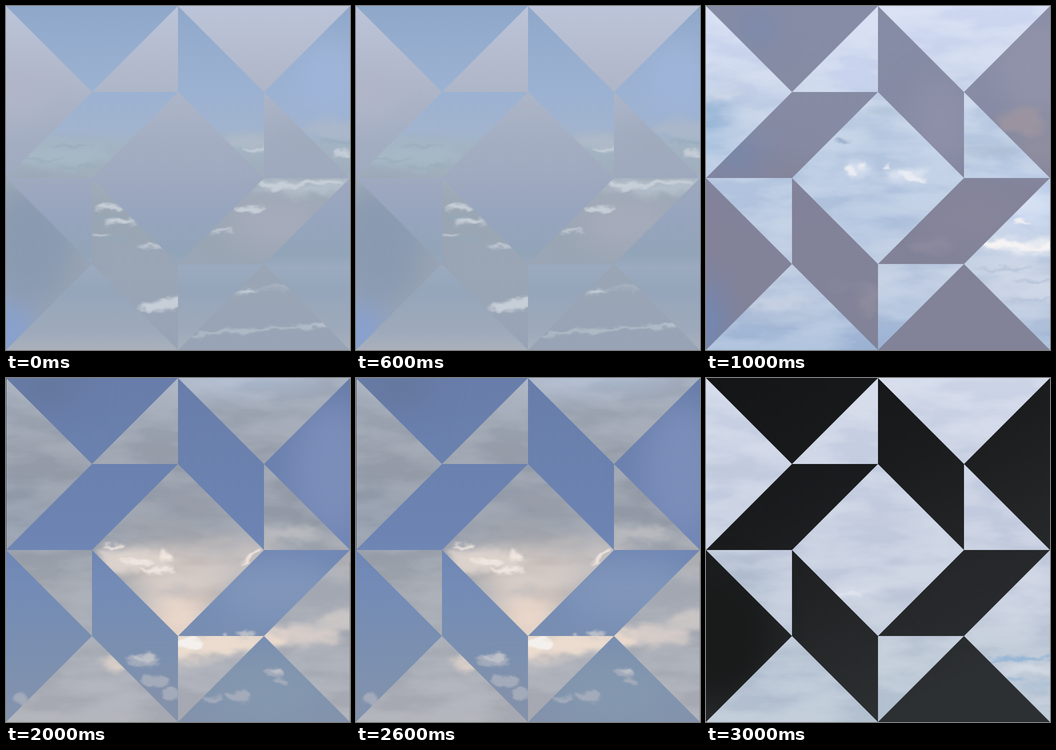
An HTML page for the animation above (4 s loop, 748 px wide and 748 px high).

```html
<!DOCTYPE html>
<html lang="en">
<head>
<meta charset="utf-8">
<title>Sky quilt</title>
<style>
html, body { margin: 0; width: 100%; height: 100%; overflow: hidden; background: #9ba9c0; }
svg { position: absolute; left: 0; top: 0; width: 100%; height: 100%; }
.sky { opacity: 0; will-change: opacity; animation: show 4s step-end calc(var(--i) * 1s - 4s) infinite; }
@keyframes show { 0% { opacity: 1; } 25%, 100% { opacity: 0; } }
.patches { clip-path: url(#patches); }
.haze { filter: url(#haze); }
.soft { filter: url(#soft); }
.wisp { filter: url(#wisp); }
.clouds { filter: url(#clouds); mix-blend-mode: soft-light; }
</style>
</head>
<body>
<svg viewBox="0 0 748 748" aria-hidden="true">
<defs>
  <clipPath id="patches">
    <path d="M0 0L187 187 0 374zM374 0V187H187zM374 0H748L561 187zM561 187L748 374H561zM374 187L561 374 374 561 187 374zM0 374H187V561zM0 748L187 561 374 748zM374 561H561L374 748zM748 374V748L561 561z"/>
  </clipPath>
  <filter id="haze" filterUnits="userSpaceOnUse" x="-150" y="-150" width="1048" height="1048" color-interpolation-filters="sRGB">
    <feGaussianBlur stdDeviation="32"/>
  </filter>
  <filter id="soft" filterUnits="userSpaceOnUse" x="-80" y="-80" width="908" height="908" color-interpolation-filters="sRGB">
    <feTurbulence type="fractalNoise" baseFrequency=".018 .03" numOctaves="3" seed="4" result="n"/>
    <feGaussianBlur in="SourceGraphic" stdDeviation="9"/>
    <feDisplacementMap in2="n" scale="38" xChannelSelector="R" yChannelSelector="G"/>
  </filter>
  <filter id="wisp" filterUnits="userSpaceOnUse" x="-40" y="-40" width="828" height="828" color-interpolation-filters="sRGB">
    <feTurbulence type="fractalNoise" baseFrequency=".03 .05" numOctaves="3" seed="9" result="n"/>
    <feGaussianBlur in="SourceGraphic" stdDeviation="2.5"/>
    <feDisplacementMap in2="n" scale="24" xChannelSelector="R" yChannelSelector="G"/>
  </filter>
  <filter id="clouds" filterUnits="userSpaceOnUse" x="0" y="0" width="748" height="748" color-interpolation-filters="sRGB">
    <feTurbulence type="fractalNoise" baseFrequency=".007 .022" numOctaves="4" seed="12"/>
    <feColorMatrix values="2.6 0 0 0 -.8  2.6 0 0 0 -.8  2.6 0 0 0 -.8  0 0 0 0 1"/>
  </filter>

  <linearGradient id="sea" x2="0" y2="1">
    <stop stop-color="#8fa8ca"/><stop offset=".25" stop-color="#9cb2d2"/>
    <stop offset=".36" stop-color="#a1b3ce"/><stop offset=".4" stop-color="#a3b4c4"/>
    <stop offset=".5" stop-color="#a0adba"/><stop offset=".6" stop-color="#9ba6b4"/>
    <stop offset="1" stop-color="#98a4b6"/>
  </linearGradient>
  <linearGradient id="mist" x2="0" y2="1">
    <stop stop-color="#bcc4d9"/><stop offset=".2" stop-color="#b1b8ca"/>
    <stop offset=".35" stop-color="#a6b0c4"/><stop offset=".5" stop-color="#9fa9bf"/>
    <stop offset=".6" stop-color="#97a5be"/><stop offset=".72" stop-color="#92a4b8"/>
    <stop offset=".76" stop-color="#9baabf"/><stop offset=".82" stop-color="#95a5ba"/>
    <stop offset=".95" stop-color="#9eaabb"/><stop offset="1" stop-color="#aab0bb"/>
  </linearGradient>
  <linearGradient id="dusk" x2="0" y2="1">
    <stop stop-color="#868ca5"/><stop offset=".4" stop-color="#868ba3"/>
    <stop offset=".55" stop-color="#82839a"/><stop offset="1" stop-color="#828398"/>
  </linearGradient>
  <linearGradient id="pale" x2="0" y2="1">
    <stop stop-color="#d6def3"/><stop offset=".2" stop-color="#cfd9ed"/>
    <stop offset=".36" stop-color="#c1d0e5"/><stop offset=".55" stop-color="#bccce3"/>
    <stop offset=".8" stop-color="#c0cde2"/><stop offset="1" stop-color="#a8bdda"/>
  </linearGradient>
  <linearGradient id="blue" x2="0" y2="1">
    <stop stop-color="#687da9"/><stop offset=".45" stop-color="#6d84b3"/>
    <stop offset=".6" stop-color="#738bb6"/><stop offset=".8" stop-color="#7b90b0"/>
    <stop offset="1" stop-color="#8493ac"/>
  </linearGradient>
  <linearGradient id="eve" x2="0" y2="1">
    <stop stop-color="#a6afbd"/><stop offset=".2" stop-color="#9ea5b1"/>
    <stop offset=".4" stop-color="#9aa1ad"/><stop offset=".6" stop-color="#a5aab3"/>
    <stop offset=".85" stop-color="#adb1ba"/><stop offset="1" stop-color="#afb1b8"/>
  </linearGradient>
  <linearGradient id="night" x2=".5" y2="1">
    <stop stop-color="#141516"/><stop offset=".4" stop-color="#191b1d"/>
    <stop offset=".7" stop-color="#232527"/><stop offset="1" stop-color="#2d3032"/>
  </linearGradient>
  <linearGradient id="veil" x2="0" y2="1">
    <stop stop-color="#d3daea"/><stop offset=".3" stop-color="#cbd3e4"/>
    <stop offset=".6" stop-color="#c9d1e1"/><stop offset=".8" stop-color="#c0cad8"/>
    <stop offset="1" stop-color="#bdc9d7"/>
  </linearGradient>
</defs>
</svg>

<svg class="sky" style="--i:0" viewBox="0 0 748 748">
  <rect width="748" height="748" fill="url(#sea)"/>
  <g class="haze">
    <ellipse cx="50" cy="520" rx="100" ry="130" fill="#8a9ab0"/>
    <ellipse cx="0" cy="715" rx="60" ry="70" fill="#86a0d0"/>
    <ellipse cx="590" cy="470" rx="110" ry="60" fill="#a5abba"/>
    <ellipse cx="700" cy="160" rx="80" ry="90" fill="#9eb4d8"/>
  </g>
  <g class="soft">
    <ellipse cx="720" cy="270" rx="75" ry="22" fill="#aab7ca"/>
    <ellipse cx="530" cy="297" rx="50" ry="18" fill="#afbac8"/>
    <ellipse cx="110" cy="325" rx="120" ry="26" fill="#a6b7c5"/>
    <ellipse cx="660" cy="392" rx="120" ry="14" fill="#b6c1cd"/>
  </g>
  <g class="wisp">
    <g fill="#93a8b8" opacity=".6">
      <ellipse cx="80" cy="335" rx="50" ry="3"/><ellipse cx="150" cy="350" rx="45" ry="3"/>
      <ellipse cx="140" cy="305" rx="45" ry="3"/><ellipse cx="225" cy="460" rx="35" ry="6"/>
      <ellipse cx="240" cy="505" rx="40" ry="4"/><ellipse cx="720" cy="295" rx="35" ry="4"/>
    </g>
    <g fill="#c6ced7">
      <ellipse cx="225" cy="437" rx="30" ry="6"/><ellipse cx="250" cy="468" rx="38" ry="6"/>
      <ellipse cx="205" cy="497" rx="24" ry="3"/><ellipse cx="315" cy="522" rx="28" ry="3"/>
      <ellipse cx="600" cy="390" rx="55" ry="8"/><ellipse cx="685" cy="384" rx="48" ry="6"/>
      <ellipse cx="530" cy="442" rx="36" ry="6"/><ellipse cx="470" cy="490" rx="28" ry="3"/>
      <ellipse cx="545" cy="312" rx="30" ry="4"/><ellipse cx="735" cy="320" rx="22" ry="5"/>
      <path d="M282 657L345 636 380 630V656L320 662z"/>
      <path d="M492 627L520 616 552 619 525 627z"/>
    </g>
    <path d="M400 716Q480 703 560 701T692 686L700 696Q620 703 550 707T400 720z" fill="#b7c0cb"/>
    <path d="M540 618Q600 605 640 610L600 618z" fill="#a7b1c0"/>
  </g>
  <g class="patches">
    <rect width="748" height="748" fill="url(#mist)"/>
    <g class="haze">
      <ellipse cx="10" cy="200" rx="70" ry="40" fill="#b1b6c8"/>
      <ellipse cx="650" cy="310" rx="80" ry="60" fill="#9faabd"/>
    </g>
  </g>
</svg>

<svg class="sky" style="--i:1" viewBox="0 0 748 748">
  <rect width="748" height="748" fill="url(#dusk)"/>
  <g class="haze">
    <ellipse cx="110" cy="45" rx="40" ry="25" fill="#7389b3"/>
    <ellipse cx="70" cy="325" rx="60" ry="35" fill="#7586ac"/>
    <ellipse cx="0" cy="690" rx="35" ry="90" fill="#7088b8"/>
    <ellipse cx="720" cy="130" rx="100" ry="110" fill="#9092a9"/>
    <ellipse cx="510" cy="250" rx="60" ry="90" fill="#8e90a8"/>
    <ellipse cx="150" cy="360" rx="70" ry="25" fill="#84859a"/>
    <ellipse cx="580" cy="460" rx="120" ry="60" fill="#86859a"/>
    <ellipse cx="725" cy="310" rx="45" ry="40" fill="#958f9e"/>
  </g>
  <g class="soft">
    <ellipse cx="690" cy="252" rx="48" ry="28" fill="#9b94a0"/>
    <ellipse cx="490" cy="520" rx="45" ry="14" fill="#8d8a9e"/>
    <ellipse cx="355" cy="640" rx="18" ry="35" fill="#8d8b9d"/>
    <ellipse cx="300" cy="607" rx="50" ry="6" fill="#89889b"/>
  </g>
  <g class="patches">
    <rect width="748" height="748" fill="url(#pale)"/>
    <g class="haze">
      <ellipse cx="0" cy="260" rx="45" ry="70" fill="#a3bfdd"/>
      <ellipse cx="680" cy="430" rx="110" ry="55" fill="#d3def3"/>
      <ellipse cx="345" cy="478" rx="70" ry="16" fill="#9db7d9"/>
      <ellipse cx="700" cy="610" rx="100" ry="60" fill="#cdd6e6"/>
      <ellipse cx="320" cy="150" rx="60" ry="40" fill="#d2dbf2"/>
    </g>
    <rect class="clouds" width="748" height="748" opacity=".24"/>
    <g class="soft">
      <ellipse cx="15" cy="228" rx="22" ry="9" fill="#96b4d3"/>
      <ellipse cx="30" cy="190" rx="50" ry="14" fill="#ced8e8"/>
      <ellipse cx="390" cy="225" rx="35" ry="14" fill="#b3c5da"/>
      <ellipse cx="620" cy="318" rx="65" ry="7" fill="#aabbd0"/>
      <ellipse cx="330" cy="355" rx="32" ry="14" fill="#d9e2f1"/>
      <ellipse cx="440" cy="365" rx="48" ry="16" fill="#dae2f0"/>
      <ellipse cx="150" cy="648" rx="90" ry="9" fill="#ccd4e3"/>
      <ellipse cx="170" cy="676" rx="110" ry="6" fill="#a9bad2"/>
      <ellipse cx="690" cy="520" rx="85" ry="16" fill="#e9ecf3"/>
      <ellipse cx="725" cy="700" rx="45" ry="8" fill="#b4c3da"/>
    </g>
    <g class="wisp">
      <ellipse cx="294" cy="294" rx="20" ry="3" transform="rotate(18 294 294)" fill="#91a7c3"/>
      <g fill="#e9ecf3">
        <ellipse cx="316" cy="360" rx="10" ry="12"/><ellipse cx="342" cy="350" rx="10" ry="6"/>
        <ellipse cx="393" cy="347" rx="9" ry="5"/>
        <ellipse cx="448" cy="372" rx="30" ry="7" transform="rotate(25 448 372)"/>
      </g>
      <g fill="#f5f3f3">
        <path d="M600 505Q640 510 680 517T755 514V526Q700 530 665 527T600 518z"/>
        <ellipse cx="682" cy="470" rx="15" ry="4"/>
      </g>
      <g fill="#b3c1d7">
        <ellipse cx="650" cy="572" rx="60" ry="3"/><ellipse cx="715" cy="598" rx="50" ry="3"/>
        <ellipse cx="710" cy="640" rx="50" ry="3"/>
      </g>
    </g>
  </g>
</svg>

<svg class="sky" style="--i:2" viewBox="0 0 748 748">
  <rect width="748" height="748" fill="url(#blue)"/>
  <g class="haze">
    <ellipse cx="90" cy="20" rx="80" ry="40" fill="#64779d"/>
    <ellipse cx="710" cy="200" rx="90" ry="150" fill="#7b8db9"/>
    <ellipse cx="590" cy="465" rx="140" ry="70" fill="#8095b9"/>
    <ellipse cx="560" cy="680" rx="140" ry="70" fill="#8397ae"/>
    <ellipse cx="340" cy="700" rx="40" ry="50" fill="#8490a9"/>
  </g>
  <g class="wisp">
    <g fill="#a3abbb">
      <ellipse cx="297" cy="614" rx="38" ry="13"/><ellipse cx="325" cy="658" rx="32" ry="12"/>
      <ellipse cx="360" cy="685" rx="18" ry="14"/><ellipse cx="585" cy="640" rx="23" ry="11"/>
      <ellipse cx="594" cy="661" rx="18" ry="8"/><ellipse cx="507" cy="693" rx="24" ry="11"/>
      <ellipse cx="452" cy="697" rx="24" ry="6"/><ellipse cx="32" cy="695" rx="15" ry="11"/>
    </g>
    <g fill="#bcc0c8">
      <ellipse cx="300" cy="608" rx="24" ry="7"/><ellipse cx="590" cy="636" rx="14" ry="6"/>
      <ellipse cx="523" cy="557" rx="20" ry="5"/><ellipse cx="479" cy="558" rx="7" ry="4"/>
    </g>
  </g>
  <g class="patches">
    <rect width="748" height="748" fill="url(#eve)"/>
    <g class="haze">
      <ellipse cx="520" cy="-10" rx="180" ry="28" fill="#b8c5dc"/>
      <ellipse cx="385" cy="425" rx="130" ry="65" fill="#d0c6c1"/>
      <ellipse cx="375" cy="530" rx="75" ry="65" fill="#ead5c7"/>
      <ellipse cx="545" cy="385" rx="40" ry="30" fill="#dfd0c7"/>
      <ellipse cx="740" cy="395" rx="30" ry="25" fill="#ded2cb"/>
      <ellipse cx="30" cy="300" rx="60" ry="70" fill="#97a1b0"/>
      <ellipse cx="420" cy="700" rx="60" ry="30" fill="#adb0ba"/>
    </g>
    <rect class="clouds" width="748" height="748" opacity=".14"/>
    <g class="soft">
      <ellipse cx="410" cy="270" rx="70" ry="22" fill="#989da9"/>
      <ellipse cx="340" cy="320" rx="80" ry="14" fill="#a0a4ad"/>
      <ellipse cx="620" cy="340" rx="75" ry="16" fill="#b9bbbf"/>
      <ellipse cx="465" cy="355" rx="32" ry="14" fill="#b7b4b5"/>
      <ellipse cx="370" cy="465" rx="45" ry="10" fill="#c4bfbf"/>
      <ellipse cx="690" cy="470" rx="75" ry="26" fill="#a2a7b2"/>
      <ellipse cx="640" cy="562" rx="90" ry="20" fill="#d6ccc8"/>
      <ellipse cx="720" cy="525" rx="50" ry="20" fill="#cbc6c5"/>
      <ellipse cx="580" cy="570" rx="26" ry="16" fill="#ecdacd"/>
      <ellipse cx="235" cy="620" rx="25" ry="14" fill="#e0d3ca"/>
      <path d="M360 552H570L540 592 360 612z" fill="#ecdccf"/>
      <ellipse cx="280" cy="395" rx="85" ry="24" fill="#dcd2cc"/>
    </g>
    <g class="wisp">
      <ellipse cx="398" cy="577" rx="28" ry="13" fill="#f4f0ed"/>
      <g fill="#f0e6df">
        <ellipse cx="347" cy="387" rx="16" ry="9"/><ellipse cx="285" cy="400" rx="38" ry="5"/>
        <ellipse cx="330" cy="417" rx="38" ry="6"/><ellipse cx="235" cy="367" rx="28" ry="4"/>
        <ellipse cx="535" cy="387" rx="28" ry="5" transform="rotate(-35 535 387)"/>
      </g>
    </g>
    <path d="M.5 0V374" stroke="#3f464f"/>
    <path d="M747.5 400V748" stroke="#878c96"/>
  </g>
</svg>

<svg class="sky" style="--i:3" viewBox="0 0 748 748">
  <rect width="748" height="748" fill="url(#night)"/>
  <g class="haze">
    <ellipse cx="30" cy="560" rx="110" ry="140" fill="#191b1b"/>
    <ellipse cx="600" cy="460" rx="110" ry="60" fill="#27292c"/>
  </g>
  <g class="patches">
    <rect width="748" height="748" fill="url(#veil)"/>
    <g class="haze">
      <ellipse cx="90" cy="440" rx="80" ry="60" fill="#b9c4d4"/>
      <ellipse cx="190" cy="660" rx="120" ry="60" fill="#bac6d5"/>
      <ellipse cx="690" cy="470" rx="70" ry="50" fill="#ccd3e3"/>
    </g>
    <rect class="clouds" width="748" height="748" opacity=".22"/>
    <g class="soft">
      <ellipse cx="350" cy="310" rx="90" ry="10" fill="#c1c9db"/>
      <ellipse cx="40" cy="200" rx="60" ry="9" fill="#bfc8d8"/>
      <ellipse cx="330" cy="465" rx="60" ry="10" fill="#d8deeb"/>
      <ellipse cx="400" cy="480" rx="50" ry="6" fill="#b9c4d4"/>
      <ellipse cx="90" cy="412" rx="60" ry="6" fill="#cad2df"/>
      <ellipse cx="700" cy="635" rx="70" ry="12" fill="#d5dce5"/>
      <ellipse cx="725" cy="672" rx="50" ry="8" fill="#a8bed4"/>
      <ellipse cx="725" cy="705" rx="40" ry="9" fill="#cfd7e1"/>
    </g>
    <g class="wisp">
      <path d="M610 616Q660 602 700 608T760 603V612Q710 617 680 614T610 620z" fill="#8fb3d6"/>
      <ellipse cx="668" cy="654" rx="22" ry="3" fill="#9bb8d4"/>
      <ellipse cx="310" cy="470" rx="30" ry="4" fill="#dfe4ef"/>
    </g>
  </g>
</svg>
</body>
</html>
```
